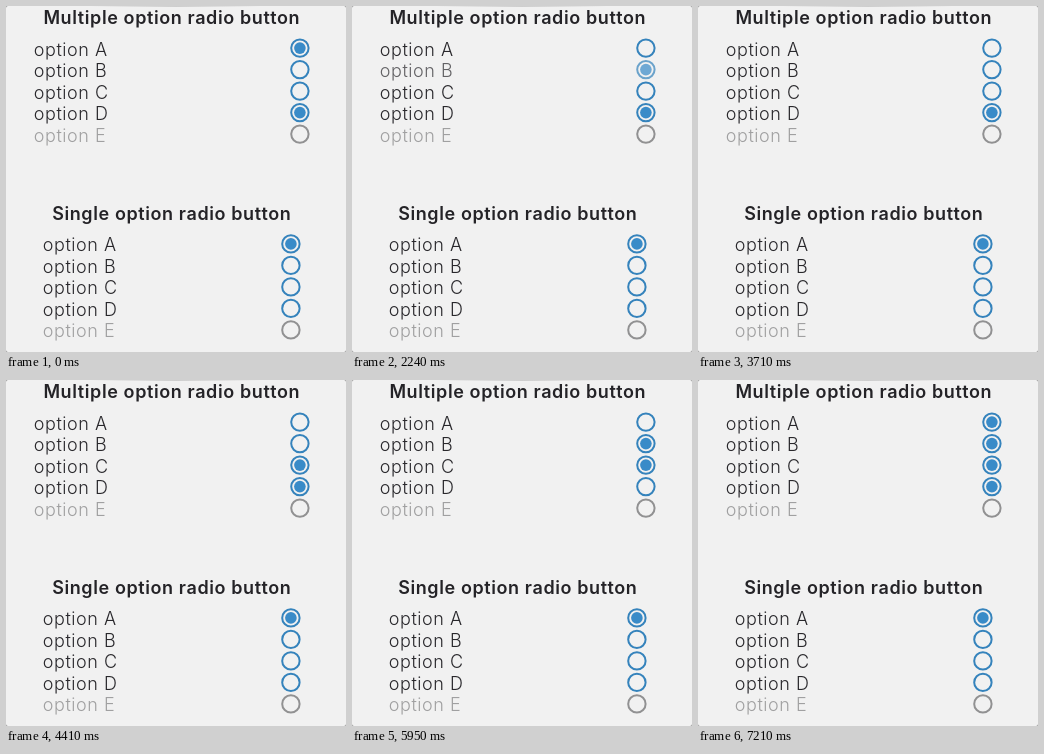
Recreate the animation shown at these times as an HTML page. Size 340 by 346 pixels, loop 8 s.

```html
<!DOCTYPE html>
<html lang="en">
<head>
<meta charset="utf-8">
<title>Radio buttons</title>
<style>
  html, body { margin: 0; width: 100%; height: 100%; overflow: hidden; background: #8c8c8c; }
  svg { display: block; width: 340px; height: 346px; }
  text { font: 300 18px Inter, "Open Sans", sans-serif; letter-spacing: .55px; fill: #29282c; }
  .title { font-weight: 600; letter-spacing: .6px; text-anchor: middle; fill: #242327; }
  .ring { fill: none; stroke: #3583bc; stroke-width: 2; }
  .dot { fill: #398bc8; opacity: 0; }
  .on .dot { opacity: 1; }
  .disabled text { fill: #a0a0a1; }
  .disabled .ring { stroke: #919192; }

  /* Rows dim on press, then recover in a few hard steps. */
  .live, .live .dot { animation: 8s step-end infinite; }
  .live.A { animation-name: pressA; }  .live.A .dot { animation-name: pickA; }
  .live.B { animation-name: pressB; }  .live.B .dot { animation-name: pickB; }
  .live.C { animation-name: pressC; }  .live.C .dot { animation-name: pickC; }
  .live.D { animation-name: pressD; }  .live.D .dot { animation-name: pickD; }

  @keyframes pressA {
    0%, 90.125%, 100% { opacity: 1; }
    86.625%, 87.5% { opacity: .2; }
    88.375% { opacity: .34; }
    89.25% { opacity: .71; }
  }
  @keyframes pressB {
    0%, 28.875%, 46.375%, 74.375%, 100% { opacity: 1; }
    41.125%, 43.75%, 70%, 71.75% { opacity: .2; }
    44.625%, 72.625% { opacity: .34; }
    28%, 45.5%, 73.5% { opacity: .71; }
  }
  @keyframes pressC {
    0%, 55.125%, 100% { opacity: 1; }
    51.625%, 52.5% { opacity: .2; }
    53.375% { opacity: .34; }
    54.25% { opacity: .71; }
  }
  @keyframes pressD {
    0%, 63.875%, 82.25%, 100% { opacity: 1; }
    60.375%, 61.25%, 78.75%, 79.625% { opacity: .2; }
    62.125%, 80.5% { opacity: .34; }
    63%, 81.375% { opacity: .71; }
  }
  @keyframes pickA { 0%, 87.5%, 100% { opacity: 1; } 28% { opacity: 0; } }
  @keyframes pickB { 0%, 43.75% { opacity: 0; } 28%, 71.75%, 100% { opacity: 1; } }
  @keyframes pickC { 0% { opacity: 0; } 52.5%, 100% { opacity: 1; } }
  @keyframes pickD { 0%, 79.625%, 100% { opacity: 1; } 61.25% { opacity: 0; } }
</style>
</head>
<body>
<svg viewBox="0 0 340 346">
  <defs>
    <linearGradient id="edge">
      <stop offset="0" stop-color="#aaa" stop-opacity="0"/>
      <stop offset=".5" stop-color="#aaa" stop-opacity=".5"/>
      <stop offset="1" stop-color="#aaa" stop-opacity="0"/>
    </linearGradient>
  </defs>
  <rect width="340" height="346" rx="2" fill="#f1f1f1"/>
  <rect x="85" width="170" height="1" fill="url(#edge)"/>
  <text class="title" x="165.8" y="18">Multiple option radio button</text>
  <g id="multiple"></g>
  <text class="title" x="165.8" y="214">Single option radio button</text>
  <g id="single"></g>
</svg>
<script>
  const row = (name, i, textX, radioX, top, kind) => {
    const y = top + i * 21.5;
    return `<g class="${name} ${kind}">
      <text x="${textX}" y="${y + 7.5}">option ${name}</text>
      <circle class="ring" cx="${radioX}" cy="${y}" r="8.7"/>
      <circle class="dot" cx="${radioX}" cy="${y}" r="5.8"/>
    </g>`;
  };

  const fill = (id, textX, radioX, top, kindOf) => {
    document.getElementById(id).innerHTML = [..."ABCDE"]
      .map((name, i) => row(name, i, textX, radioX, top, name === "E" ? "disabled" : kindOf(name)))
      .join("");
  };

  fill("multiple", 27.8, 293.9, 42.1, () => "live");
  fill("single", 36.8, 284.9, 237.9, name => name === "A" ? "on" : "");
</script>
</body>
</html>
```
